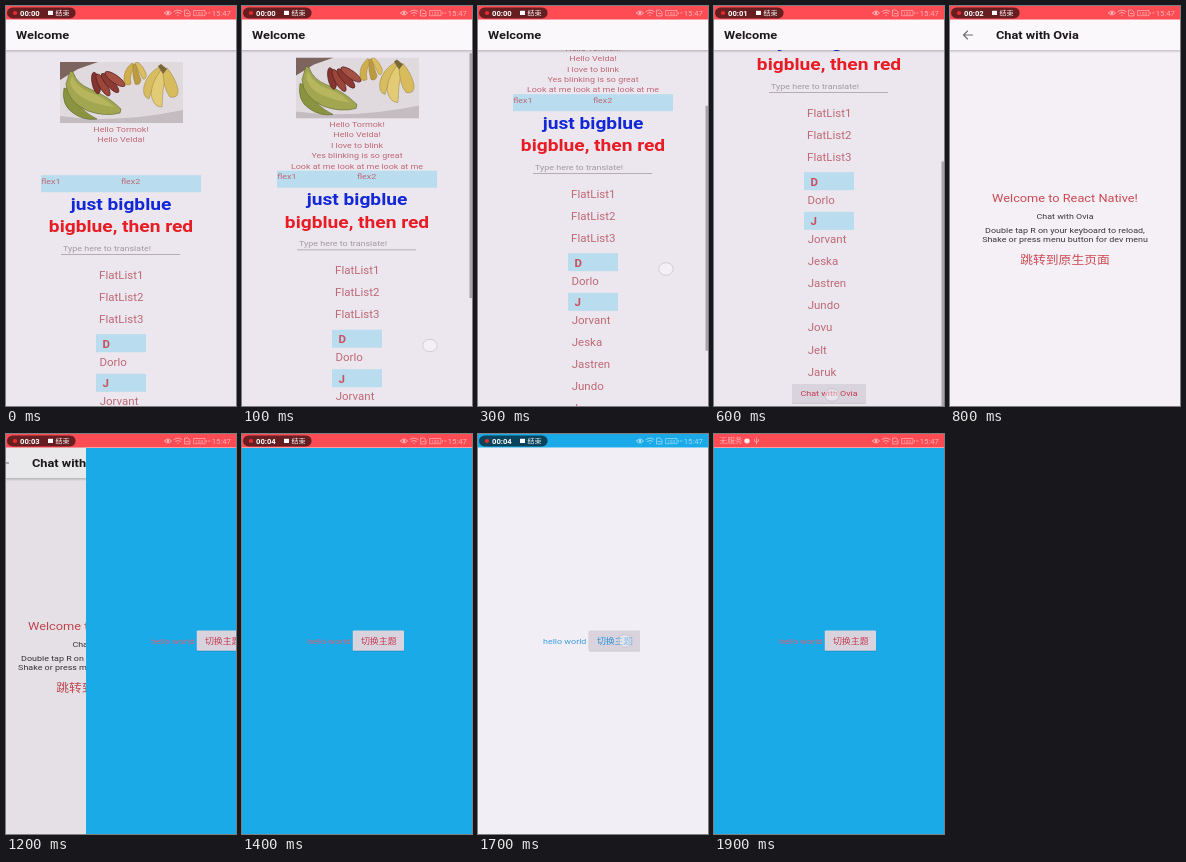
Animation, 230 px wide and 400 px high, one loop 2 s. Source, as an HTML page:

```html
<!DOCTYPE html>
<html lang="zh-CN">
<head>
<meta charset="utf-8">
<title>App demo</title>
<style>
  html, body { margin: 0; width: 100%; height: 100%; overflow: hidden; background: #ece6ef; }
  svg { display: block; width: 100vw; height: 100vh; }
  text { font-family: Roboto, "Noto Sans CJK SC", "Noto Sans CJK", sans-serif; white-space: pre; }
</style>
</head>
<body>
<svg id="stage" viewBox="0 0 230 400" xmlns="http://www.w3.org/2000/svg"></svg>
<script>
const RED = '#ff4b53', BLUE = '#1aaae8', SOFT = '#bd6a75', INK = '#1c181c';
const LOOP = 2000, STEP = 100, SCROLL_MAX = 162;

// The 360 x 720 dp screen is shown on 230 x 400, so text is sized in sp.
function label(x, y, str, sp, fill, opt = {}) {
  const { anchor = 'start', weight = 400, id = '' } = opt;
  return `<text ${id && `id="${id}"`} transform="translate(${x} ${y}) scale(${230 / 360} ${400 / 720})"
    font-size="${sp}" fill="${fill}" font-weight="${weight}" text-anchor="${anchor}">${str}</text>`;
}
const mid = (y, str, sp, fill, weight) => label(115, y, str, sp, fill, { anchor: 'middle', weight });
const rect = (x, y, w, h, fill, more = '') =>
  `<rect x="${x}" y="${y}" width="${w}" height="${h}" fill="${fill}" ${more}/>`;
const path = (d, fill, more = '') => `<path d="${d}" fill="${fill}" ${more}/>`;
const line = (d, color, w) => path(d, 'none', `stroke="${color}" stroke-width="${w}" stroke-linecap="round"`);

const button = (x, y, w, h) =>
  rect(x, y + 0.8, w, h, '#000', 'opacity=".18" rx="1"') + rect(x, y, w, h, '#d9d3de', 'rx="1"');

const header = (x, title) =>
  rect(0, 13, 230, 31, '#faf8fb') + rect(0, 44, 230, 3, 'url(#shade)') +
  label(x, 33.3, title, 20, INK, { weight: 700 });

function photo() {
  const olive = 'stroke="#5f6630" stroke-width=".6"';
  const gold = 'stroke="#94803e" stroke-width=".5"';
  const redBanana = (x, y, len, turn, fill) =>
    `<ellipse rx="3.9" ry="${len}" fill="${fill}" stroke="#522022" stroke-width=".7"
      transform="translate(${x} ${y}) rotate(${turn})"/>`;
  return `<g clip-path="url(#photo)">
    ${rect(54, 56, 123, 61, '#e0dade')}
    ${path('M54 56H92L72 63L54 74Z', '#7c655f')}
    ${path('M54 110Q110 118 177 104V117H54Z', '#c4bcc0')}
    ${path('M58 82Q55 99 67 107Q78 115 91 113Q72 104 64 84Z', '#8a9440', olive)}
    ${path('M64 65L67 66Q71 78 84 83Q102 90 115 103L114 107Q99 111 82 105Q61 96 60 78Z', '#a3a650', olive)}
    ${path('M66 70Q71 82 85 87Q99 92 108 101Q92 99 79 93Q66 86 64 76Z', '#b7b65f')}
    ${redBanana(90, 77, 11, -12, '#84352f')}
    ${redBanana(97, 79, 12.5, -30, '#9c4539')}
    ${redBanana(104, 77, 12.5, -42, '#8c3a32')}
    ${redBanana(109, 73, 12, -55, '#a65044')}
    ${path('M126 57Q117 64 118 75Q120 81 125 78Q123 68 129 60Z', '#d1ae4c', gold)}
    ${path('M127 58Q126 70 129 78Q134 80 135 74Q132 66 130 58Z', '#bd9a40', gold)}
    ${path('M129 57Q133 66 137 73Q141 74 140 67Q137 60 132 56Z', '#dcbd60', gold)}
    ${path('M153 61Q141 68 138 80Q136 91 143 93Q145 82 156 68Z', '#d8bd60', gold)}
    ${path('M155 64Q146 75 145 88Q147 101 156 101Q156 84 160 67Z', '#e3cb76', gold)}
    ${path('M157 63Q157 83 164 91Q173 93 172 83Q169 71 161 62Z', '#d8bb5c', gold)}
    ${path('M152 60L155 58L161 63L157 68Z', '#7a6636')}
  </g>`;
}

function welcomePage() {
  const rows = (names, x, y) => names.map((n, i) => label(x, y + i * 22.2, n, 18, SOFT)).join('');
  const section = (y, s) => rect(90, y, 50, 18, '#b9dcee') +
    label(96.4, y + 13.5, s, 18, '#c9505c', { weight: 700 });
  const blink = ['I love to blink', 'Yes blinking is so great', 'Look at me look at me look at me'];
  return rect(0, 13, 230, 387, '#ece6ef') + `<g id="list">
    ${photo()}
    ${mid(125.5, 'Hello Tormok!', 14, SOFT)}
    ${mid(135.9, 'Hello Velda!', 14, SOFT)}
    <g id="blink">${blink.map((s, i) => mid(146.5 + i * 10.4, s, 14, SOFT)).join('')}</g>
    ${rect(35, 169.2, 160, 17, '#b9dcee')}
    ${label(35.2, 178, 'flex1', 14, SOFT)}${label(115, 178, 'flex2', 14, SOFT)}
    ${mid(204, 'just bigblue', 30, '#1228d6', 700)}
    ${mid(226.3, 'bigblue, then red', 30, '#e81c24', 700)}
    ${label(57, 245, 'Type here to translate!', 14, '#a39aa3')}
    ${rect(55, 248, 119, 0.8, '#a99fa6')}
    ${rows(['FlatList1', 'FlatList2', 'FlatList3'], 93.1, 272.6)}
    ${section(328.2, 'D')}${rows(['Dorlo'], 93.5, 359.5)}
    ${section(367.8, 'J')}
    ${rows(['Jorvant', 'Jeska', 'Jastren', 'Jundo', 'Jovu', 'Jelt', 'Jaruk'], 93.7, 398.6)}
    ${button(78, 540, 74, 19)}${mid(552.4, 'Chat with Ovia', 14, '#c23a50')}
  </g>` + rect(227.5, 44, 2.5, 245, '#a8a3aa', 'id="bar"') + header(10, 'Welcome');
}

function chatPage() {
  return rect(0, 13, 230, 387, '#f4f0f6') + header(46, 'Chat with Ovia') +
    line('M22.5 29H13.5M17.5 25L13.5 29L17.5 33', '#6f6a70', 1.1) +
    mid(196, 'Welcome to React Native!', 20, '#cb4a54') +
    mid(213.3, 'Chat with Ovia', 14, '#3a343a') +
    mid(226.8, 'Double tap R on your keyboard to reload,', 14, '#3a343a') +
    mid(236, 'Shake or press menu button for dev menu', 14, '#3a343a') +
    mid(258.3, '跳转到原生页面', 20, '#cb4a54');
}

function nativePage() {
  return rect(0, 13, 230, 1, '#faf8fb') + rect(0, 14, 230, 386, BLUE, 'id="paper"') +
    label(65, 210.3, 'hello world', 14, RED, { id: 'hello' }) +
    button(110.7, 196.6, 51.3, 20.2) +
    label(136.8, 210, '切换主题', 14, RED, { id: 'swap', anchor: 'middle' });
}

function statusBar() {
  const pale = 'rgba(255,255,255,.58)';
  return rect(0, 0, 230, 13.5, RED, 'id="status"') +
    `<g id="pill">${rect(1, 1.4, 68.6, 11, '#000', 'rx="5.5" opacity=".6"')}
      <ellipse cx="9" cy="7" rx="2.2" ry="1.9" fill="#e22d2e"/>
      ${label(14, 9.6, '00:00', 12, '#fff', { id: 'timer', weight: 700 })}
      ${rect(42, 4.8, 5, 4.2, '#fff')}
      ${label(49.5, 9.4, '结束', 11, '#fff', { weight: 500 })}</g>
    <g id="carrier">${label(5.5, 9.4, '无服务', 12, pale)}
      <ellipse cx="33" cy="7" rx="2.7" ry="2.4" fill="#fff" opacity=".9"/>
      ${line('M42.5 4V10M40.5 5.5V7L42.5 8.5L44.5 7V5.5', pale, 0.8)}</g>` +
    line('M158.5 7Q162 2.8 165.5 7Q162 11.2 158.5 7', pale, 0.9) +
    `<circle cx="162" cy="7" r="1.4" fill="${pale}"/>` +
    line('M168 5.5Q172 2.5 176 5.5M169.5 7.3Q172 5.4 174.5 7.3M171.7 9.3H172.3', pale, 0.9) +
    line('M179 4H182L184 6V10H179ZM180.5 7.5H182.5', pale, 0.8) +
    line('M188 4.5H199V9.7H188ZM200.5 6.5V7.8M202.3 7H204', pale, 0.7) +
    label(189, 9, '100', 7.5, pale) + label(205.8, 9.5, '15:47', 12, pale);
}

document.getElementById('stage').innerHTML = `<defs>
    <linearGradient id="shade" x2="0" y2="1"><stop stop-opacity=".2"/><stop offset="1" stop-opacity="0"/></linearGradient>
    <clipPath id="photo">${rect(54, 56, 123, 61, '#000')}</clipPath>
  </defs>
  <g id="welcome">${welcomePage()}</g>
  <g id="chat">${chatPage()}</g>
  ${rect(0, 13, 230, 387, '#000', 'id="dim"')}
  <g id="native">${nativePage()}</g>
  ${statusBar()}
  <ellipse id="touch" rx="7.2" ry="6.3" fill="#fff" fill-opacity=".4" stroke="#b9aeb8" stroke-opacity=".75" stroke-width=".7"/>`;

const el = id => document.getElementById(id);
const set = (id, attrs) => Object.entries(attrs).forEach(([k, v]) => el(id).setAttribute(k, v));
const show = (id, on) => set(id, { display: on ? 'inline' : 'none' });
const move = (id, x, y) => set(id, { transform: `translate(${x} ${y})` });
const smooth = p => (p = Math.min(1, Math.max(0, p)), p * p * (3 - 2 * p));

function touchAt(n, scroll) {
  if (n >= 1 && n <= 4) return [188, 344 - scroll];
  return { 6: [118, 389], 10: [118, 254], 15: [147, 207], 17: [147, 207] }[n];
}

function draw(t) {
  const n = Math.floor(t / STEP);

  const scroll = SCROLL_MAX * smooth((n - 0.5) / 5);
  show('welcome', n < 8);
  move('list', 0, -scroll);
  show('blink', n >= 1 && n <= 3);
  show('bar', n >= 1 && n <= 6);
  move('bar', 0, scroll * 245 / 356);

  const x = n < 12 ? 230 : [80, 8][n - 12] || 0;
  const slid = 1 - x / 230;
  show('chat', n >= 7 && x > 0);
  move('chat', -30.7 * slid, n === 7 ? 6 : 0);
  set('chat', { opacity: n === 7 ? 0.85 : 1 });
  set('dim', { opacity: 0.1 * slid });
  move('native', x, 0);

  const light = n >= 15 && n < 18;
  set('status', { fill: light ? BLUE : RED });
  set('paper', { fill: light ? '#f2eef5' : BLUE });
  set('hello', { fill: light ? '#3a9de0' : '#d8647a' });
  set('swap', { fill: light ? '#2a90da' : '#c23a50' });

  show('pill', n < 19);
  show('carrier', n === 19);
  el('timer').textContent = '00:0' + Math.floor(n * 0.29);

  const at = touchAt(n, scroll);
  show('touch', at);
  if (at) move('touch', ...at);
}

const start = performance.now();
function tick() {
  draw((performance.now() - start) % LOOP);
  requestAnimationFrame(tick);
}
tick();
</script>
</body>
</html>
```
